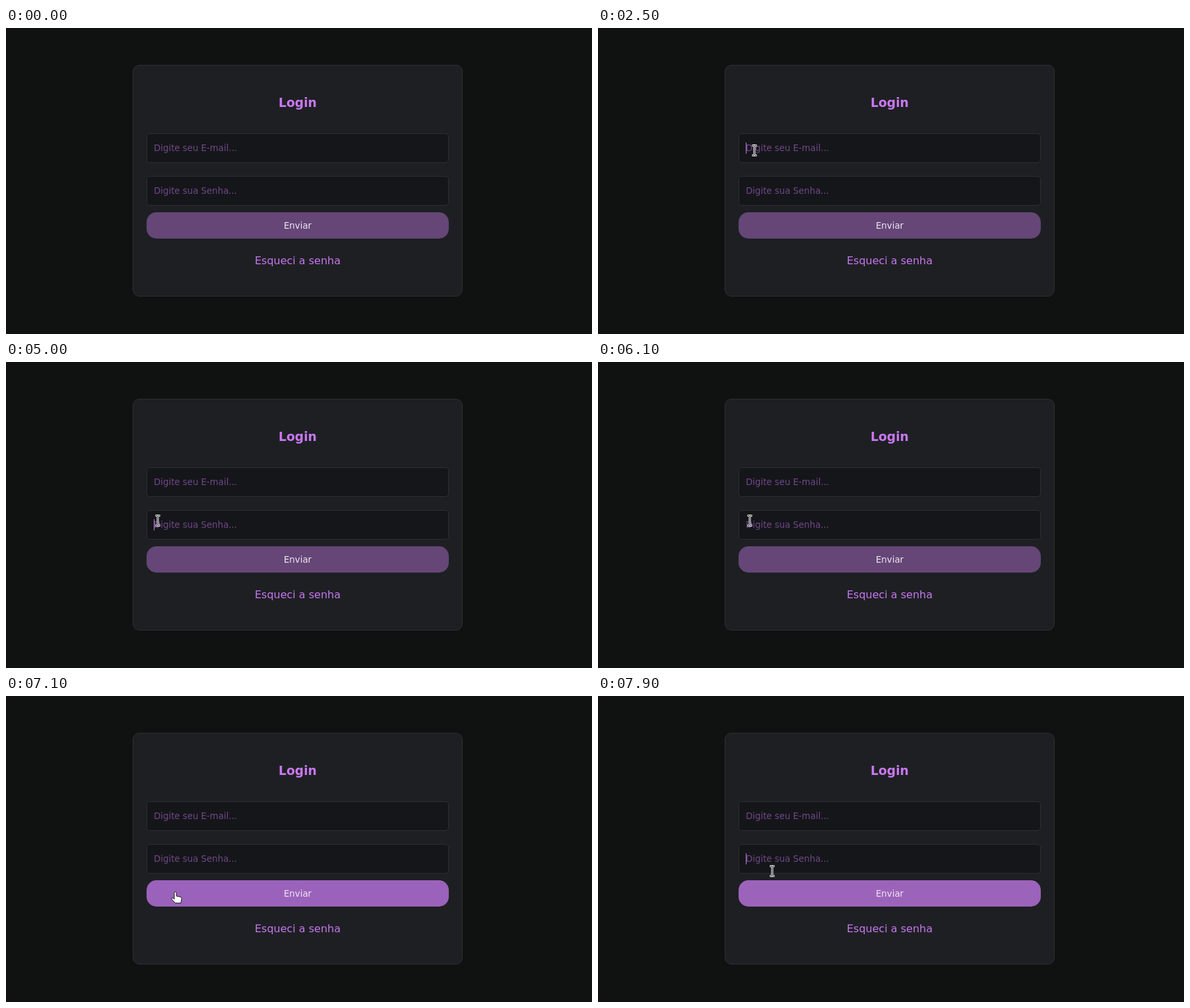
An HTML page that plays this animation: 888 by 465 pixels, repeating every 8000 ms.

```html
<!DOCTYPE html>
<html lang="pt">
<head>
<meta charset="utf-8">
<title>Login</title>
<style>
  html, body { margin: 0; width: 100%; height: 100%; overflow: hidden; background: #101211; }
  svg { display: block; }
  text { font: 13.333px "DejaVu Sans", sans-serif; }
  .mid { text-anchor: middle; fill: #c778f0; }
  .field { fill: #151619; stroke: #2d2e32; }
  .hint { fill: #70488a; }
  .caret { fill: #c778f0; }
</style>
</head>
<body>
<svg width="888" height="465" viewBox="0 0 888 465">
  <rect x="192.5" y="56.5" width="499" height="351" rx="9.5" fill="#1e1f23" stroke="#2e2f34"/>
  <text class="mid" x="442" y="120" style="font-size:18.72px;font-weight:bold">Login</text>
  <rect class="field" x="213.5" y="160.5" width="457" height="44" rx="4.5"/>
  <text class="hint" x="224" y="187">Digite seu E-mail...</text>
  <rect class="field" x="213.5" y="225.5" width="457" height="44" rx="4.5"/>
  <text class="hint" x="224" y="252">Digite sua Senha...</text>
  <rect id="button" x="213" y="280" width="458" height="40" rx="15"/>
  <text class="mid" x="442" y="305" style="fill:#f0e8f4">Enviar</text>
  <text class="mid" x="442" y="359" style="font-size:16px">Esqueci a senha</text>
  <rect id="mailCaret" class="caret" x="224" y="174" width="1" height="17"/>
  <rect id="passCaret" class="caret" x="224" y="239" width="1" height="17"/>

  <path id="arrow" d="M.5 .8V16.7L4.3 13.2 7.2 19.3 9.7 18.2 7 12.2H12.2Z" fill="#16161a" stroke="#fff"/>
  <g id="beam" fill="none">
    <path d="M.5 1.5H7.5M.5 16.5H7.5M4 1.5V16.5" stroke="#fff" stroke-width="3"/>
    <path d="M1 1.5H3.2L4 2.5 4.8 1.5H7M1 16.5H3.2L4 15.5 4.8 16.5H7M4 2.5V15.5" stroke="#111"/>
  </g>
  <path id="hand" d="M5 11V2.2a1.6 1.6 0 0 1 3.2 0V7l6 1.3q2 .6 2 2.5l-.7 4.2q-.5 1-.5 2.7H6.5L1 11.7q-.6-1.6 1-1.9 1.3 0 3 2Z" fill="#fff" stroke="#141416"/>
</svg>
<script>
const LOOP = 8000;
const el = id => document.getElementById(id);
const pointers = ["arrow", "beam", "hand"];

// The pointer jumps: time, shape, left, top
const jumps = [
  [900, "arrow", 122, 55], [1100, "arrow", 143, 108], [1200, "arrow", 173, 163],
  [1300, "arrow", 199, 191], [1400, "arrow", 211, 200],
  [1600, "beam", 231, 188], [1800, "beam", 240, 177], [2500, "beam", 233, 177],
  [3300, "arrow", 240, 207], [3400, "beam", 227, 221], [3600, "beam", 226, 222],
  [3800, "beam", 226, 233], [3900, "beam", 226, 229], [4200, "beam", 226, 232],
  [6500, "beam", 227, 246], [6600, "hand", 230, 283], [6700, "hand", 236, 293],
  [6800, "hand", 242, 296], [6900, "hand", 246, 297], [7000, "hand", 249, 297],
  [7100, "hand", 250, 297], [7800, "beam", 260, 260], [7900, "beam", 260, 257]
];

const clamp = v => Math.min(1, Math.max(0, v));
const bezier = (a, b, s) => 3 * a * s * (1 - s) ** 2 + 3 * b * s * s * (1 - s) + s ** 3;

// CSS "ease" timing, solved by bisection
function ease(x) {
  let lo = 0, hi = 1;
  for (let i = 0; i < 20; i++) {
    const s = (lo + hi) / 2;
    if (bezier(.25, .25, s) < x) lo = s; else hi = s;
  }
  return bezier(.1, 1, lo);
}

const within = (t, from, to) => t >= from && t < to;
const show = (id, on) => el(id).style.display = on ? "" : "none";

function draw(t) {
  t = Math.floor(t / 100) * 100;
  const now = jumps.filter(j => j[0] <= t).pop();
  for (const id of pointers) show(id, now && now[1] === id);
  if (now) el(now[1]).setAttribute("transform", `translate(${now[2]} ${now[3]})`);

  show("mailCaret", within(t, 2500, 3600) || within(t, 4900, 5000));
  show("passCaret", within(t, 5000, 6100) || t >= 7400);

  const hover = ease(clamp((t - 6595) / 1000)) - ease(clamp((t - 7750) / 1000));
  const mix = (a, b) => Math.round(a + (b - a) * hover);
  el("button").setAttribute("fill", `rgb(${mix(101, 168)},${mix(70, 105)},${mix(119, 203)})`);
}

const start = performance.now();
function frame() {
  draw((performance.now() - start) % LOOP);
  requestAnimationFrame(frame);
}
frame();
</script>
</body>
</html>
```
